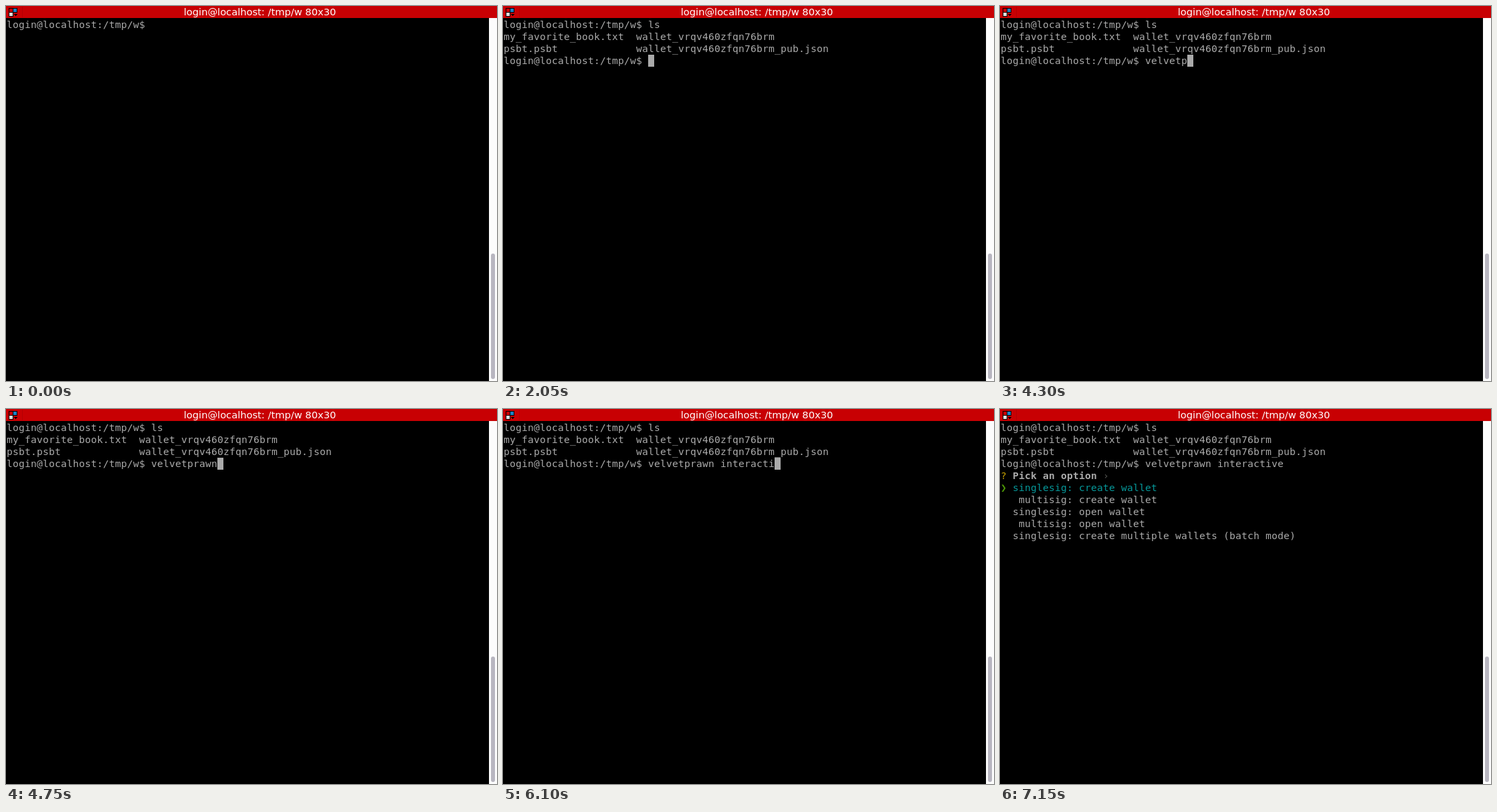
These frames come from a looping animation (734x562 px, 8 s). An HTML page with a canvas:

```html
<!DOCTYPE html>
<html lang="en">
<head>
<meta charset="utf-8">
<title>Terminal session</title>
<style>
  html, body { margin: 0; width: 100%; height: 100%; overflow: hidden; background: #000; }
  canvas { display: block; }
</style>
</head>
<body>
<canvas id="stage" width="734" height="562"></canvas>
<script>
const ctx = document.getElementById('stage').getContext('2d');
const LOOP = 8000, CELL_W = 9, CELL_H = 18, LEFT = 1, TOP = 19, BASELINE = 14;
const GREY = '#aaaaaa', CYAN = '#06989a', GREEN = '#4e9a06', AMBER = '#c4a000', DIM = '#555753';
const RED = '#c80003';
const SIZE = '14.667px';
const MONO = `${SIZE} "DejaVu Sans Mono", monospace`;

const HOST = 'login@localhost:';
const PROMPT = HOST + '/tmp/w$ ';
const LISTED = 2050, MENU = 7150;

const commands = [
  { row: 0, start: 0, text: 'ls', keys: [1050, 1200] },
  { row: 3, start: LISTED, text: 'velvetprawn interactive', keys: [
    3150, 3300, 3400, 3500, 3650, 3800, 4300, 4350, 4500, 4650, 4750, 4950,
    5150, 5250, 5300, 5350, 5500, 5600, 5700, 5900, 6100, 6200, 6300] },
];
const cursorOn = [[550, 1700], [2000, 2500], [3050, 6850], [7100, MENU]];

function box(color, x, y, w, h) {
  ctx.fillStyle = color;
  ctx.fillRect(x, y, w, h);
}

// One glyph per cell keeps the columns on the grid.
function print(row, col, text, color = GREY, bold = false) {
  ctx.font = (bold ? 'bold ' : '') + MONO;
  ctx.fillStyle = color;
  [...text].forEach((ch, i) => {
    if (ch !== ' ') ctx.fillText(ch, LEFT + (col + i) * CELL_W, TOP + row * CELL_H + BASELINE);
  });
}

function drawWindow() {
  box('#000', 0, 0, 734, 562);
  box(RED, 0, 0, 734, 18);
  box('#b40003', 24, 1, 1, 16);

  // Group button: three panes and a drop-down arrow
  box('#000', 4, 3, 13, 7);
  box('#000', 4, 9, 7, 7);
  box(RED, 5, 4, 5, 5);
  box('#1b82c4', 11, 4, 5, 5);
  box('#dddddd', 5, 10, 5, 5);
  box('#000', 12, 12, 5, 1);
  box('#000', 13, 13, 3, 1);
  box('#000', 14, 14, 1, 1);

  ctx.font = `${SIZE} "DejaVu Sans", sans-serif`;
  ctx.fillStyle = '#fff';
  ctx.textAlign = 'center';
  ctx.fillText(HOST + ' /tmp/w 80x30', 379.5, 14);
  ctx.textAlign = 'left';

  box('#fcfcfc', 722, 18, 12, 544);
  ctx.fillStyle = '#b8b6c0';
  ctx.beginPath();
  ctx.roundRect(725, 371, 6, 188, 3);
  ctx.fill();
}

function drawListing() {
  const wallet = 'wallet_vrqv460zfqn76brm';
  print(1, 0, 'my_favorite_book.txt');
  print(1, 22, wallet);
  print(2, 0, 'psbt.psbt');
  print(2, 22, wallet + '_pub.json');
}

function drawMenu() {
  print(4, 0, '?', AMBER);
  print(4, 2, 'Pick an option', GREY, true);
  print(4, 17, '›', DIM);
  print(5, 0, '❯', GREEN);
  [
    'singlesig: create wallet',
    ' multisig: create wallet',
    'singlesig: open wallet',
    ' multisig: open wallet',
    'singlesig: create multiple wallets (batch mode)',
  ].forEach((item, i) => print(5 + i, 2, item, i ? GREY : CYAN));
}

function draw(t) {
  drawWindow();
  if (t >= LISTED) drawListing();
  if (t >= MENU) drawMenu();

  let cursor;
  for (const { row, start, text, keys } of commands) {
    if (t < start) continue;
    const line = PROMPT + text.slice(0, keys.filter(k => t >= k).length);
    print(row, 0, line);
    cursor = { row, col: line.length };
  }
  if (cursorOn.some(([from, to]) => t >= from && t < to)) {
    box(GREY, LEFT + cursor.col * CELL_W, TOP + cursor.row * CELL_H, CELL_W, CELL_H);
  }
}

const begin = performance.now();
function tick() {
  draw((performance.now() - begin) % LOOP);
  requestAnimationFrame(tick);
}
tick();
</script>
</body>
</html>
```
